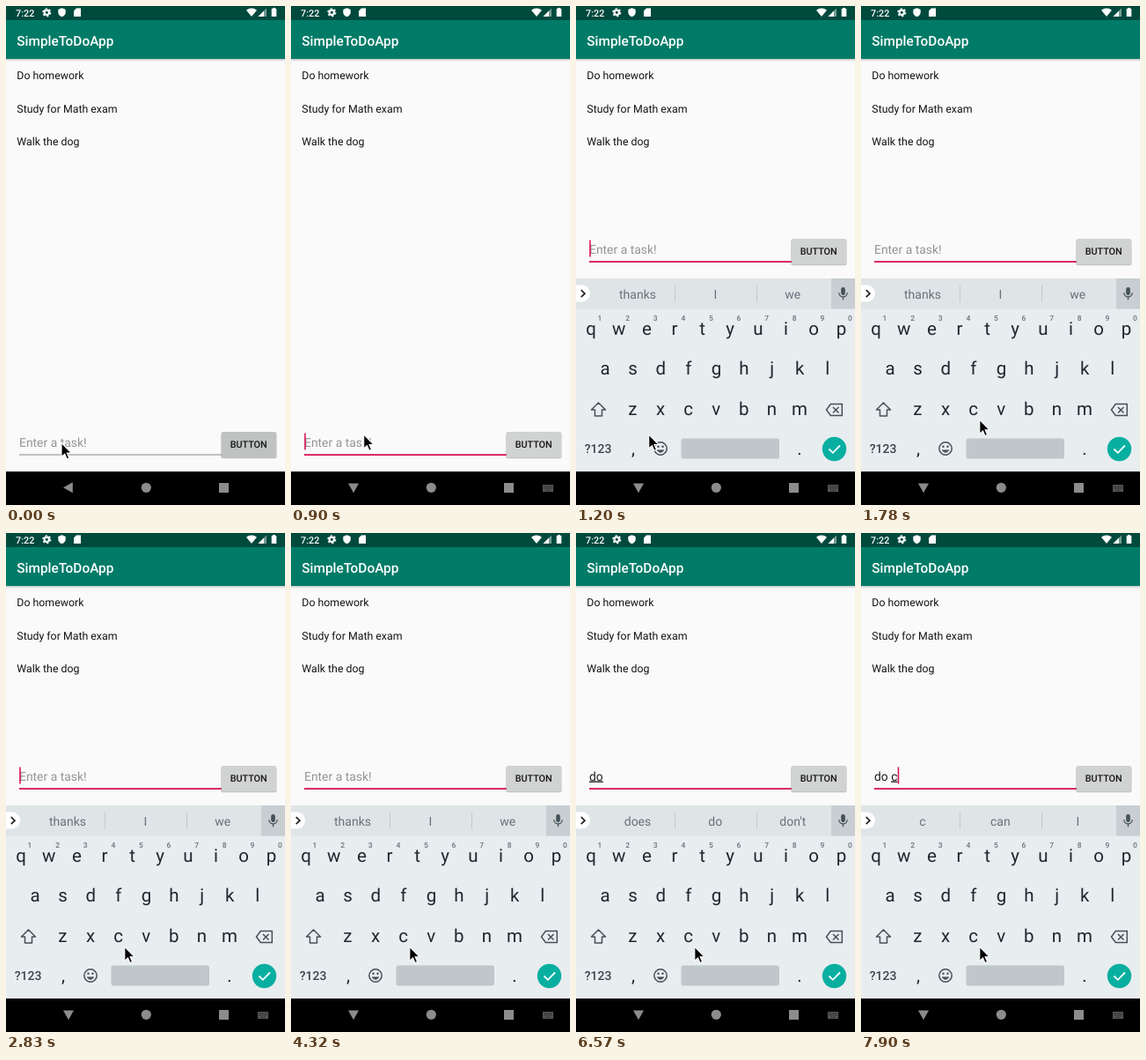
These frames come from a looping animation (317 by 566 pixels, 8 s). An HTML page:

```html
<!DOCTYPE html>
<html lang="en">
<head>
<meta charset="utf-8">
<title>To-do list</title>
<style>
  html, body { margin: 0; width: 100%; height: 100%; overflow: hidden; background: #000; }
  svg { display: block; width: 317px; height: 566px; font-family: Roboto, sans-serif; text-rendering: geometricPrecision; }
  text { white-space: pre; }
  .mid { text-anchor: middle; }
  .medium { font-weight: 500; }
  .line { fill: none; stroke: #455058; stroke-width: 1.5; }
  #list { font-size: 12.35px; fill: #141414; }
  #field { font-size: 13.9px; }
  #words { font-size: 14px; fill: #66727a; }
  #keys { font-size: 20.5px; fill: #1d282e; }
  #digits { font-size: 8.5px; fill: #68747b; font-weight: 500; }
  #composing { text-decoration: underline; }
</style>
</head>
<body>
<svg viewBox="0 0 317 566">
  <defs>
    <linearGradient id="shade" x2="0" y2="1">
      <stop stop-color="#000" stop-opacity=".22"/>
      <stop offset="1" stop-color="#000" stop-opacity="0"/>
    </linearGradient>
  </defs>
  <rect width="317" height="528" fill="#fafafa"/>

  <rect width="317" height="16" fill="#00493d"/>
  <rect y="16" width="317" height="44" fill="#007b68"/>
  <rect y="60" width="317" height="3" fill="url(#shade)"/>
  <g fill="#fff">
    <text class="medium" x="11" y="11.5" font-size="10.8">7:22</text>
    <circle cx="46.3" cy="7.3" r="2.7" fill="none" stroke="#fff" stroke-width="2.2"/>
    <circle cx="46.3" cy="7.3" r="4.4" fill="none" stroke="#fff" stroke-width="1.3" stroke-dasharray="2.3"/>
    <path d="M63.5 2.3 67.7 4V7.2Q67.5 10.8 63.5 12.3 59.5 10.8 59.3 7.2V4Z"/>
    <path d="M80 2.5H85V12H77V5.5Z"/>
    <path d="M273 4.8Q279 .4 285 4.8L279 12Z"/>
    <path d="M296 2.5V12H286.5Z" fill-opacity=".45"/>
    <path d="M293 5.5V12H286.5Z"/>
    <path d="M303.2 2H305.8V3H307.3V12H301.7V3H303.2Z"/>
    <text class="medium" x="12.3" y="44.5" font-size="15.4">SimpleToDoApp</text>
  </g>
  <g id="list"></g>

  <g id="field">
    <rect id="underline" x="15" width="231"/>
    <text id="hint" x="15" y="499.5" fill="#949494">Enter a task!</text>
    <text id="typed" x="15" y="499.5" fill="#202020" xml:space="preserve"><tspan id="done"></tspan><tspan id="composing"></tspan></text>
    <rect id="caret" y="484.5" width="1.6" height="19" fill="#d6135c"/>
    <rect x="244.3" y="484" width="63.2" height="29.3" rx="2" fill="#000" fill-opacity=".22"/>
    <rect id="button" x="244.8" y="483" width="62.2" height="29" rx="1.5"/>
    <text class="mid medium" x="275.7" y="501" font-size="10.8" fill="#161616">BUTTON</text>
  </g>

  <rect y="528" width="317" height="38"/>
  <g fill="#8c8c8c">
    <path id="back" d="M65 546.3 75.8 540.3V552.3Z"/>
    <circle cx="159.3" cy="546.3" r="5.6"/>
    <rect x="242" y="541" width="11" height="11"/>
    <g id="switcher">
      <path d="M286 543H298V551H286Z" fill="#555"/>
      <path d="M287.5 545H297M287.5 547H297M289.5 549.3H295" stroke="#111" stroke-width="1" stroke-dasharray="1"/>
    </g>
  </g>

  <g id="keyboard">
    <rect y="309" width="317" height="219" fill="#e8edf0"/>
    <rect y="309" width="317" height="34.5" fill="#dfe4e7"/>
    <rect x="290" y="309" width="27" height="34.5" fill="#c8ced1"/>
    <path d="M112.5 317V336M205.5 317V336" stroke="#c3cacd"/>
    <path d="M0 316.5H6.5A9.5 9.5 0 0 1 6.5 335.5H0Z" fill="#fff"/>
    <path class="line" d="M5.8 322.2 10 326.2 5.8 330.2" style="stroke: #222; stroke-width: 1.7"/>
    <rect x="301.2" y="319" width="4.6" height="9" rx="2.3" fill="#455058"/>
    <path class="line" d="M298.8 325.2A4.7 4.7 0 0 0 308.2 325.2M303.5 330V333.3" style="stroke-width: 1.3"/>
    <g id="words" class="mid"></g>
    <g id="keys" class="mid"></g>
    <g id="digits" class="mid"></g>
    <path class="line" d="M25.5 450 33.5 458H29.5V465H21.5V458H17.5Z" stroke-linejoin="round"/>
    <path class="line" d="M289.3 451.5H302.3V464.5H289.3L284.5 458ZM292 455 298.5 461.5M298.5 455 292 461.5"/>
    <text class="medium" x="9.7" y="507" font-size="14" fill="#39454c">?123</text>
    <circle class="line" cx="96" cy="502" r="7.2"/>
    <path class="line" d="M92 503.8Q96 509 100 503.8Z" style="fill: #455058; stroke-width: .6"/>
    <circle cx="93.5" cy="499.8" r="1.2" fill="#455058"/>
    <circle cx="98.5" cy="499.8" r="1.2" fill="#455058"/>
    <rect x="119.5" y="490.5" width="111.5" height="23" rx="2.5" fill="#bfc7ca"/>
    <circle cx="293.5" cy="502.5" r="13.7" fill="#08afa0"/>
    <path d="M287.5 502.5 291.8 506.8 300 498.5" fill="none" stroke="#fff" stroke-width="1.8"/>
  </g>

  <path id="pointer" d="M0 0V16L3.7 12.6 6.2 18.3 8.8 17.2 6.3 11.5H11.4Z" stroke="#fff" stroke-width="1.1"/>
</svg>
<script>
const LOOP = 8000;
const FOCUS = 900, OPEN = 1050, SETTLED = 1200;

const pointerSteps = [[0, 63, 495.5], [600, 81.3, 487], [750, 82.7, 486], [1640, 99, 480.5], [1780, 134.8, 469.3]];
const caretToggles = [FOCUS, 1340, 1930, 2380, 2830, 3430, 3870, 4320, 4920, 5370, 5670, 6570, 6710, 7310, 7750];
// time, finished text, text being composed, suggestions
const typingSteps = [
  [0, "", "", "thanks I we"],
  [5670, "", "d", "d do did"],
  [6120, "", "do", "does do don't"],
  [6710, "do ", "", "not you I"],
  [7900, "do ", "c", "c can I"],
];

const $ = id => document.getElementById(id);
const set = (id, attrs) => Object.entries(attrs).forEach(([k, v]) => $(id).setAttribute(k, v));
const show = (id, on) => set(id, { visibility: on ? "visible" : "hidden" });
const stepAt = (steps, t) => steps.filter(s => t >= s[0]).pop();

function addText(parent, x, y, text = "") {
  const el = document.createElementNS("http://www.w3.org/2000/svg", "text");
  el.setAttribute("x", x);
  el.setAttribute("y", y);
  el.textContent = text;
  return $(parent).appendChild(el);
}

["Do homework", "Study for Math exam", "Walk the dog"].forEach((task, i) => addText("list", 12.3, 83.3 + i * 37.2, task));

const KEY = 31.6;
const addRow = (parent, x, y, chars) => [...chars].forEach((c, i) => addText(parent, x + i * KEY, y, c));
addRow("keys", 17.2, 372.7, "qwertyuiop");
addRow("keys", 33, 418.3, "asdfghjkl");
addRow("keys", 64.4, 464.2, "zxcvbnm");
addText("keys", 65, 509, ",");
addText("keys", 254, 509, ".");
addRow("digits", 27, 357, "1234567890");
const words = [70, 158.3, 246.3].map(x => addText("words", x, 331.7));

function draw(t) {
  const focused = t >= FOCUS, open = t >= OPEN, sliding = open && t < SETTLED;

  set("field", { transform: `translate(0 ${open ? -219 : 0})` });
  set("underline", focused ? { y: 508.2, height: 1.8, fill: "#d6135c" } : { y: 508.5, height: 1, fill: "#8a8a8a" });
  set("button", { fill: focused ? "#d1d2d2" : "#bfc2c1" });
  set("back", { transform: focused ? "rotate(-90 71 546.3)" : "" });
  show("switcher", focused);

  show("keyboard", open);
  set("keyboard", { transform: `translate(0 ${sliding ? 6.7 : 0})`, opacity: sliding ? 0.84 : 1 });

  const [, done, composing, suggestions] = stepAt(typingSteps, t);
  $("done").textContent = done;
  $("composing").textContent = composing;
  show("hint", !(done + composing));
  suggestions.split(" ").forEach((word, i) => words[i].textContent = word);

  show("caret", caretToggles.filter(at => t >= at).length % 2);
  set("caret", { x: 15.2 + $("typed").getComputedTextLength() });

  const [, x, y] = stepAt(pointerSteps, t);
  set("pointer", { transform: `translate(${x} ${y})` });
}

function tick() {
  draw(performance.now() % LOOP);
  requestAnimationFrame(tick);
}
tick();
</script>
</body>
</html>
```
